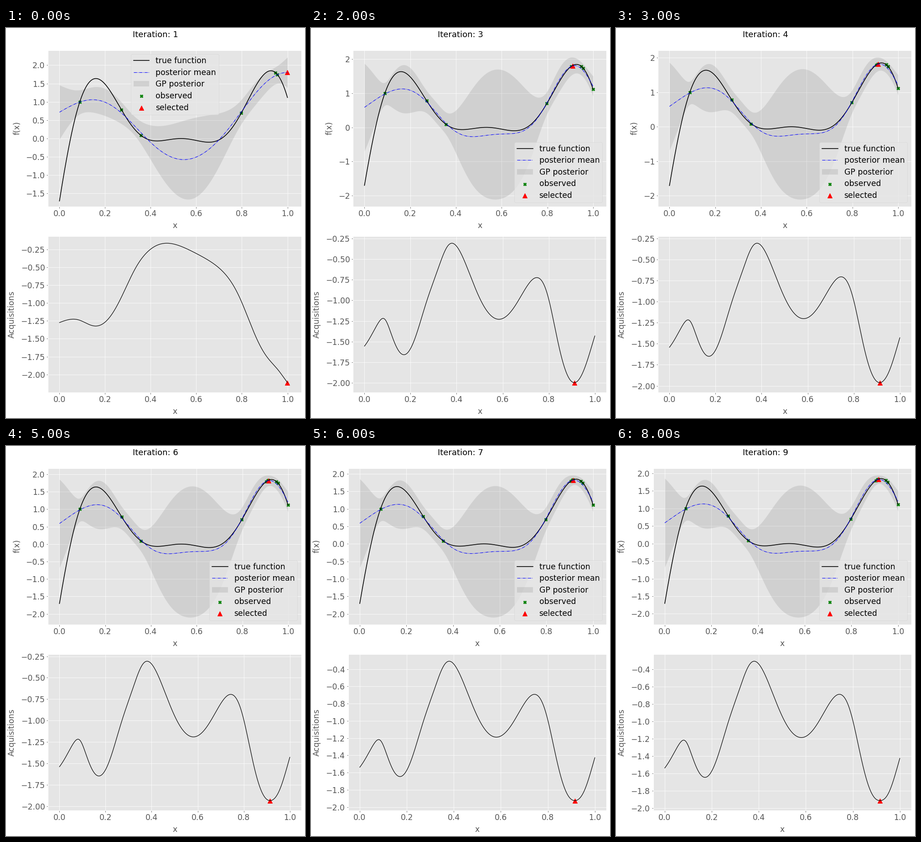
A matplotlib script that plays this animation: 656x854 px, repeating every 9000 ms.

```python
import numpy as np
import matplotlib.pyplot as plt
from matplotlib.animation import FuncAnimation
from matplotlib.ticker import MultipleLocator

W, H, DPI = 656, 854, 72
FONT = 17.28
GREY = "#555555"
STEPS = 9

plt.rcParams.update({
    "font.family": "DejaVu Sans",
    "font.size": FONT,
    "axes.facecolor": "#E5E5E5",
    "axes.edgecolor": "white",
    "axes.linewidth": 1,
    "axes.axisbelow": True,
    "axes.grid": True,
    "grid.color": "white",
    "grid.linestyle": "-",
    "grid.linewidth": 0.8,
    "patch.linewidth": 0.5,
    "xtick.color": GREY,
    "ytick.color": GREY,
    "legend.fontsize": FONT,
    "legend.labelspacing": 0.44,
    "legend.borderpad": 0.35,
})

X = np.linspace(0, 1, 1001)
START = [.089, .272, .357, .798, .948, .956]
NOISE = 0.029


def truth(x):
    return -13.49 * (x - .5331)**2 * np.cos(9.495 * (x - .5448))


def kernel_params(k):
    """Length scale and variance; they settle geometrically after a refit."""
    if k == 0:
        return .195, .925
    rest = .3**(k - 1)
    return .12 - .003 * rest, 1 + .075 * rest


def posterior(k, seen):
    """Mean and standard deviation of a zero-mean GP with an RBF kernel."""
    length, var = kernel_params(k)

    def kernel(a, b):
        return var * np.exp(-(a[:, None] - b)**2 / (2 * length**2))

    cross = kernel(seen, X)
    gain = np.linalg.solve(kernel(seen, seen) + NOISE * np.eye(len(seen)),
                           cross)
    sd = np.sqrt(var - (cross * gain).sum(axis=0))
    return truth(seen) @ gain, sd


def optimise():
    seen = np.array(START)
    steps = []
    for k in range(STEPS):
        mean, sd = posterior(k, seen)
        acq = -(mean + 1.5 * sd)
        best = acq.argmin()
        steps.append((seen, mean, sd, acq, best))
        seen = np.append(seen, X[best])
    return steps


steps = optimise()
fig = plt.figure(figsize=(W / DPI, H / DPI), dpi=DPI, facecolor="white")


def put(x, y, s, size=FONT, color=GREY, rotation=0):
    fig.text(x / W, 1 - y / H, s, size=size, color=color, ha="center",
             va="baseline", rotation=rotation, rotation_mode="anchor")


def panel(left, top, bottom, x0, x1, step):
    """Axes placed in pixels, with data 0 and 1 at pixel columns x0 and x1."""
    right = 648
    ax = fig.add_axes([left / W, 1 - bottom / H,
                       (right - left) / W, (bottom - top) / H])
    ax.set_xlim((left - x0) / (x1 - x0), (right - x0) / (x1 - x0))
    ax.xaxis.set_major_locator(MultipleLocator(.2))
    ax.yaxis.set_major_locator(MultipleLocator(step))
    put((left + right) / 2, bottom + 47.3, "x")
    return ax


def set_range(ax, values, below=.05, above=.05):
    lo, hi = values.min(), values.max()
    ax.set_ylim(lo - below * (hi - lo), hi + above * (hi - lo))


def mark(ax, x, y):
    ax.scatter([x], [y], s=100, marker="^", color="red", lw=1,
               label="selected")


def draw(k):
    fig.clear()
    seen, mean, sd, acq, best = steps[k]
    late, whole = k >= 6, 1 <= k <= 3
    left, x0 = (81.5, 107) if late else (92.5, 117.3)
    top_x1, low_x1 = (617.5, 617.5) if k == 0 else (618.8, 622.7)

    put(W / 2, 19.5, f"Iteration: {k + 1}", size=18, color="black")

    ax = panel(left, 48.5, 390.7, x0, top_x1, 1 if whole else .5)
    low, high = mean - 2 * sd, mean + 2 * sd
    ax.plot(X, truth(X), color="black", lw=1.6, label="true function")
    ax.plot(X, mean, color="blue", lw=1.1, ls="-.", label="posterior mean")
    ax.fill_between(X, low, high, color="gray", alpha=.2, lw=0,
                    label="GP posterior")
    ax.scatter(seen, truth(seen), s=50, marker="X", color="green", lw=.5,
               label="observed")
    mark(ax, X[best], mean[best])
    set_range(ax, np.append(low, high))
    ax.legend(loc="upper center" if k == 0 else "lower right")
    put(18 if late else 46 if whole else 29.5, 219.6, "f(x)", rotation=90)

    ax = panel(left, 456, 797.6, x0, low_x1, .2 if late else .25)
    ax.plot(X, acq, color="black", lw=1.2)
    mark(ax, X[best], acq[best])
    set_range(ax, acq, below=.069)  # room for the marker
    put(18, 627, "Acquisitions", rotation=90)
    return []


anim = FuncAnimation(fig, draw, frames=STEPS, interval=1000, repeat=True,
                     repeat_delay=0, init_func=lambda: draw(0), blit=False)
plt.show()
```
